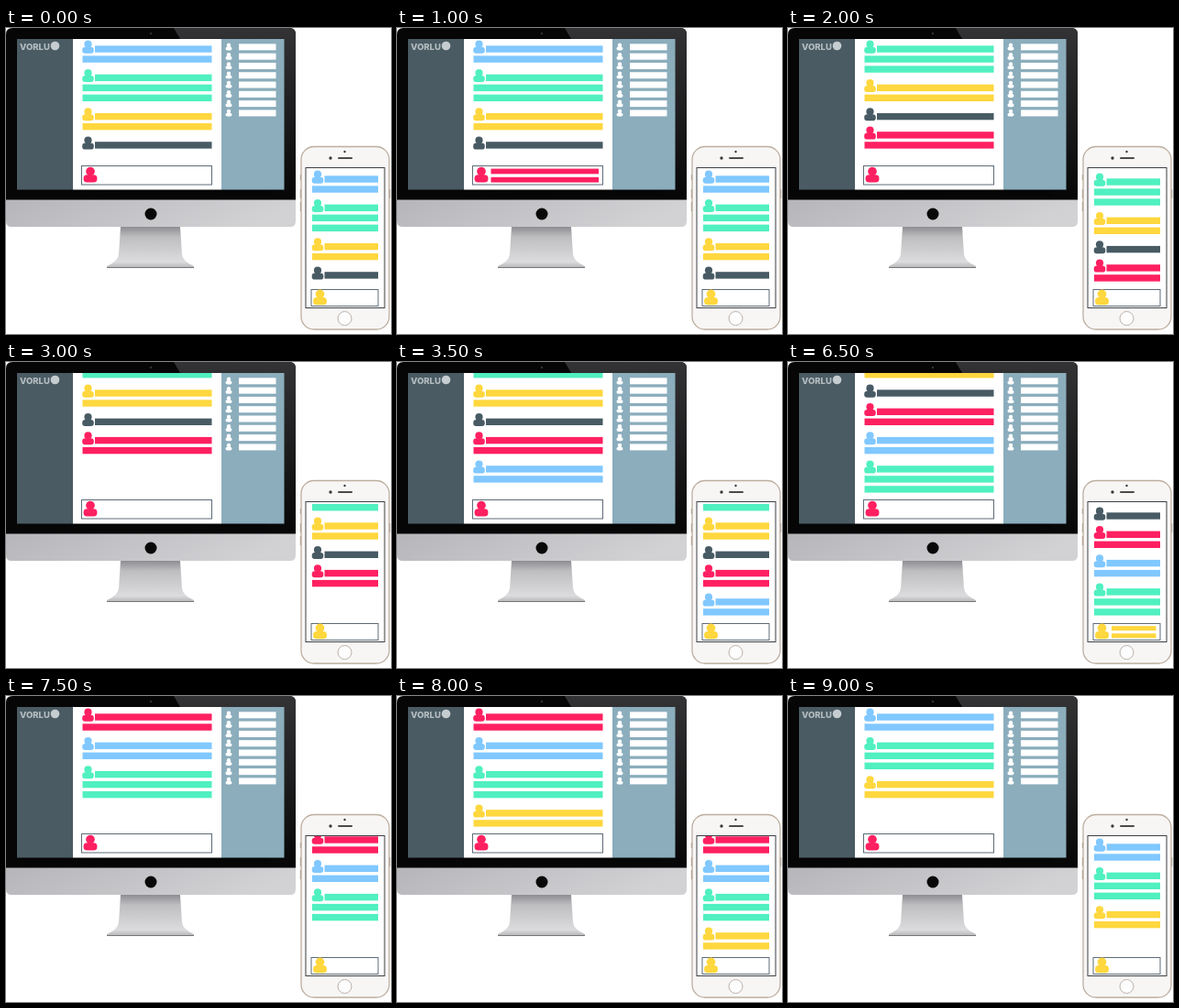
Animation of 420 by 334 pixels, one loop 9.5 s. Source, as an HTML page:

```html
<!DOCTYPE html>
<html lang="en">
<head>
<meta charset="utf-8">
<title>Chat on two devices</title>
<style>
html, body { margin: 0; width: 100%; height: 100%; overflow: hidden; background: #fff; }
svg { display: block; }
</style>
</head>
<body>
<svg width="420" height="334" viewBox="0 0 420 334">
  <defs>
    <linearGradient id="chin" x2="1" y2=".2">
      <stop stop-color="#b6b6ba"/><stop offset="1" stop-color="#d2d2d5"/>
    </linearGradient>
    <linearGradient id="neck" x2="0" y2="1">
      <stop stop-color="#8e8e92"/><stop offset=".25" stop-color="#bebec1"/>
      <stop offset=".85" stop-color="#dcdcde"/><stop offset="1" stop-color="#b4b4b7"/>
    </linearGradient>
    <linearGradient id="glare" x2="0" y2="1">
      <stop stop-color="#333335"/><stop offset="1" stop-color="#060607"/>
    </linearGradient>
    <clipPath id="deskClip"><rect x="73" y="12" width="162" height="164.500"/></clipPath>
    <clipPath id="phoneClip"><rect x="327" y="153" width="86" height="152"/></clipPath>
    <g id="person">
      <rect x="-6.300" y="-.5" width="12.600" height="7" rx="3.200"/>
      <circle cy="-3.500" r="4.100"/>
    </g>
  </defs>

  <!-- monitor -->
  <path d="M125 217H190L192 247Q193 255 205 260V262H110V260Q122 255 123 247Z" fill="url(#neck)"/>
  <path d="M110 261.500H205" stroke="#77777a"/>
  <path d="M0 187H316V211Q316 217 310 217H6Q0 217 0 211Z" fill="url(#chin)"/>
  <path d="M0 187.500V7Q0 0 7 0H309Q316 0 316 7V187.500Z" fill="#060607"/>
  <path d="M183 0H309Q316 0 316 7V187H293Z" fill="url(#glare)"/>
  <circle cx="158" cy="6" r="1.200" fill="#30343a"/>
  <circle cx="158" cy="203" r="6.500" fill="#080808"/>
  <path d="M12 12H73V176.500H12Z" fill="#4a5b63"/>
  <path d="M73 12H235V176.500H73Z" fill="#fff"/>
  <path d="M235 12H303.500V176.500H235Z" fill="#8badbc"/>
  <text x="15" y="23.500" font-family="Inter, Arial, sans-serif" font-size="9.500" font-weight="800" fill="#b4bdc1">VORLU</text>
  <circle cx="53.500" cy="19.500" r="4.800" fill="#c6cdd0"/>
  <g id="contacts"></g>
  <g id="desk" clip-path="url(#deskClip)"></g>

  <!-- phone -->
  <path d="M321.500 160V166M321.500 176V186M321.500 190V200M418.500 176V186" stroke="#a89a8c" stroke-width="1.400"/>
  <rect x="322" y="129.500" width="96" height="199.500" rx="14" fill="#f8f6f5" stroke="#bcae9f" stroke-width="1.300"/>
  <circle cx="369.500" cy="135" r="1.200" fill="#39393c"/>
  <circle cx="354" cy="142" r="1.700" fill="#39393c"/>
  <path d="M363 142H377" stroke="#4c4a4a" stroke-width="2" stroke-linecap="round"/>
  <circle cx="369.500" cy="317" r="7.500" fill="#fdfdfd" stroke="#b9b2ac"/>
  <rect x="327" y="152.500" width="86" height="153" fill="#fff" stroke="#3c3f43"/>
  <g id="phone" clip-path="url(#phoneClip)"></g>
</svg>
<script>
const LOOP = 9500, BEAT = 500, FIRST = 4;
const LINE = 11, GAP = 20.3, STEP = 31.3;
const RED = '#ff2061', YELLOW = '#ffd73e';

// five writers take turns, each always with the same number of lines
const writers = [['#80c8ff', 2], ['#50f0c0', 3], [YELLOW, 2], ['#485b64', 1], [RED, 2]];

// the chat scrolls at these times; a message fills the space one beat later
const scrollTimes = [1500, 3000, 4500, 7500, 9000];

const desk = {
  el: document.getElementById('desk'), left: 83.5, right: 224.5, top: 23,
  boxTop: 150.5, boxHeight: 20.5, color: RED, typing: [500, 1500],
  scroll: n => STEP * n
};
const phone = {
  el: document.getElementById('phone'), left: 334, right: 406, top: 165,
  boxTop: 285.5, boxHeight: 18, color: YELLOW, typing: [6000, 7500],
  scroll: n => STEP * n + (n % 5 > 2 ? 8 : n % 5 ? -3 : 0)
};

const bar = (x1, x2, y, h, color) =>
  `<rect x="${x1}" y="${y - h / 2}" width="${x2 - x1}" height="${h}" fill="${color}"/>`;
const person = (x, y, scale, color) =>
  `<use href="#person" transform="translate(${x} ${y}) scale(${scale})" fill="${color}"/>`;
const scrollsBy = t => scrollTimes.filter(s => s <= t).length;

function typedLines([start, end], t) {
  return t < start || t >= end ? 0 : Math.min(2, 1 + Math.floor((t - start) / BEAT));
}

function draw(view, t) {
  const { left, right, boxTop, boxHeight, color } = view;
  const sent = FIRST + scrollsBy(t - BEAT);
  let y = view.top - view.scroll(scrollsBy(t)), out = '';
  for (let m = 0; m < sent; m++) {
    const [tint, lines] = writers[m % writers.length];
    out += person(left + 6, y - 1.8, 1, tint);
    for (let i = 0; i < lines; i++) out += bar(left + (i ? 0 : 13.5), right, y + i * LINE, 7.4, tint);
    y += (lines - 1) * LINE + GAP;
  }
  out += `<rect x="${left - 1}" y="${boxTop}" width="${right - left + 1}" height="${boxHeight}" fill="#fff" stroke="#5d6b78"/>`;
  out += person(left + 8.5, boxTop + boxHeight / 2, 1.18, color);
  for (let i = 0; i < typedLines(view.typing, t); i++)
    out += bar(left + 19, right - 4.5, boxTop + boxHeight * (.29 + .45 * i), boxHeight * .28, color);
  view.el.innerHTML = out;
}

let contacts = '';
for (let i = 0; i < 8; i++) {
  const y = 20.8 + i * 10.3;
  contacts += person(243, y, .55, '#fff') + bar(254, 294.5, y, 7, '#fff');
}
document.getElementById('contacts').innerHTML = contacts;

let shown;
function frame(now) {
  const t = Math.floor(now % LOOP / BEAT) * BEAT;
  if (t !== shown) {
    shown = t;
    draw(desk, t);
    draw(phone, t);
  }
  requestAnimationFrame(frame);
}
frame(0);
</script>
</body>
</html>
```
